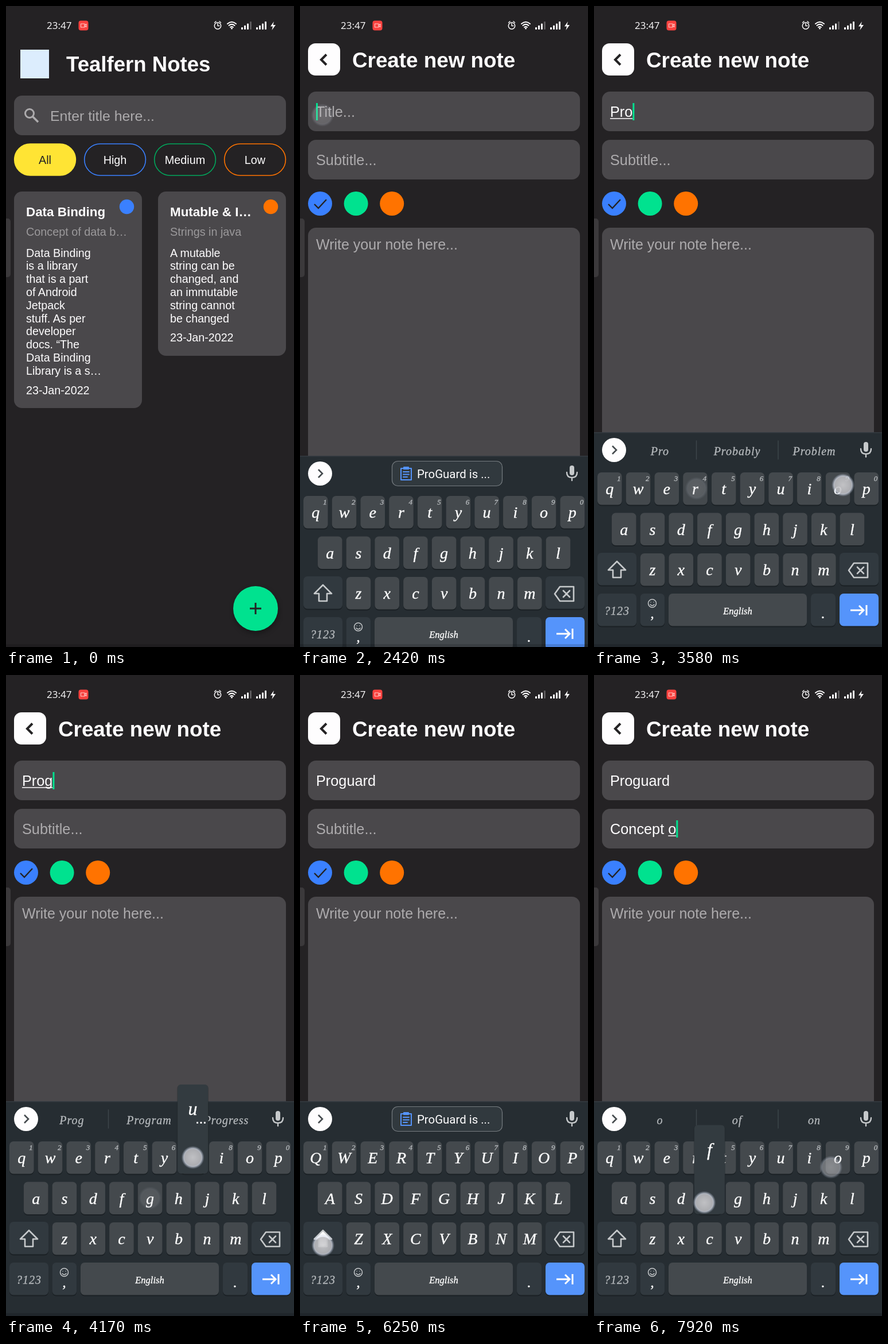
Recreate the animation shown at these times as an HTML page. Size 502 by 1116 pixels, loop 8 s.

```html
<!DOCTYPE html>
<html lang="en">
<head>
<meta charset="utf-8">
<title>Notes app</title>
<style>
html, body { margin: 0; width: 100%; height: 100%; overflow: hidden; background: #242224; }
svg { display: block; width: 502px; height: 1116px; font-family: "Liberation Sans", Arial, sans-serif; }
.b { font-weight: 700; }
.mid { text-anchor: middle; }
.kb { font-family: "Liberation Serif", "Noto Serif", serif; font-style: italic; fill: #fff; stroke: #fff; stroke-width: .35; text-anchor: middle; }
.dim { fill: #b4b8bb; stroke: #b4b8bb; }
.line { fill: none; stroke-linecap: round; stroke-linejoin: round; }
</style>
</head>
<body>
<svg id="stage" viewBox="0 0 502 1116"></svg>
<script>
const LOOP = 8000, FPS = 12;
const BG = '#242224', CARD = '#4a484b', HINT = '#adabad', WHITE = '#fefdfe';
const BLUE = '#3a80ff', GREEN = '#00e28f', ORANGE = '#ff7300';
const KEY = '#44494d', DARK_KEY = '#31393f', KEYBOARD = '#262d32';
const FIELD_SIZE = 25.3;

// Drawing helpers
const text = (x, y, size, str, fill = WHITE, cls = '') =>
  `<text x="${x}" y="${y}" font-size="${size}" fill="${fill}" class="${cls}">${str}</text>`;
const box = (x, y, w, h, r, fill, extra = '') =>
  `<rect x="${x}" y="${y}" width="${w}" height="${h}" rx="${r}" fill="${fill}" ${extra}/>`;
const disc = (x, y, r, fill, extra = '') => `<circle cx="${x}" cy="${y}" r="${r}" fill="${fill}" ${extra}/>`;
const line = (d, stroke, w, extra = '') =>
  `<path class="line" d="${d}" stroke="${stroke}" stroke-width="${w}" ${extra}/>`;
const script = (x, y, size, str, cls = '', extra = '') =>
  `<text x="${x}" y="${y}" font-size="${size}" class="kb ${cls}" ${extra}>${str}</text>`;
const group = (id, body) => `<g id="${id}">${body}</g>`;
const SHARP = 'style="stroke-linecap:butt;stroke-linejoin:miter"';

const bars = (x, n) => [0, 1, 2, 3].map(i =>
  box(x + i * 5, 37 - i * 3.3, 3, 4 + i * 3.3, 1, i < n ? WHITE : '#5c5a5c')).join('');

const statusBar = () =>
  `<text x="71" y="40" font-size="17" fill="${WHITE}" style="font-family:'Open Sans','Noto Sans',sans-serif">23:47</text>` +
  box(126.5, 25.5, 17, 17, 4, '#f8423f') +
  line('M130.5 31h6.5v6h-6.5zM137 33.5l3-2v5l-3-2', '#ffc9c6', 1.1) +
  line('M369 30.5v4h3M363.5 29l2.5-2.2M374.5 29l-2.5-2.2', WHITE, 1.4) +
  disc(369, 34.5, 5.7, 'none', `stroke="${WHITE}" stroke-width="1.5"`) +
  line('M386 31q7.5-6.5 15 0M388.5 34q5-4.2 10 0M391 37q2.5-2 5 0', WHITE, 2) +
  disc(393.5, 39, 1.5, WHITE) + bars(410, 3) + bars(436, 4) +
  `<path d="M467 27l-6 8.5h4l-1.5 6.5 6.5-9h-4.5z" fill="${WHITE}"/>`;

const fab = icon => disc(436, 1053, 39, '#000', 'opacity=".35" filter="url(#blur)"') +
  disc(435, 1049, 39, GREEN) + icon;

function noteCard(x, h, dot, title, sub, lines, date) {
  const tx = x + 21;
  return box(x, 323, 223, h, 14, CARD) + disc(x + 196.5, 349.5, 12.7, dot) +
    text(tx, 366, 22.4, title, WHITE, 'b') + text(tx, 400, 19.8, sub, '#9b999b') +
    lines.map((s, i) => text(tx, 436.5 + i * 22.8, 19.7, s)).join('') +
    text(tx, 447.5 + lines.length * 22.8, 19.7, date);
}

const home = () =>
  box(25, 76, 50, 50, 0, '#dcedfd') +
  text(105, 113.5, 36.6, 'Tealfern Notes', WHITE, 'b') +
  box(14, 156, 474, 69, 14, CARD) +
  disc(41, 187, 7.5, 'none', `stroke="${HINT}" stroke-width="3"`) + line('M46.5 192.5l9.5 9.5', HINT, 3.6, SHARP) +
  text(77, 200, 24.8, 'Enter title here...', HINT) +
  [['All', '#ffe434'], ['High', BLUE], ['Medium', '#00a85c'], ['Low', ORANGE]].map(([s, c], i) =>
    box(14.7 + i * 122, 240, 106.7, 55, 27.5, i ? 'none' : c, `stroke="${c}" stroke-width="1.6"`) +
    text(68 + i * 122, 274.5, 19.8, s, i ? WHITE : BG, 'mid')).join('') +
  noteCard(14, 377, BLUE, 'Data Binding', 'Concept of data b…',
    ['Data Binding', 'is a library', 'that is a part', 'of Android', 'Jetpack', 'stuff. As per', 'developer',
      'docs. “The', 'Data Binding', 'Library is a s…'], '23-Jan-2022') +
  noteCard(265, 286, ORANGE, 'Mutable &amp; I…', 'Strings in java',
    ['A mutable', 'string can be', 'changed, and', 'an immutable', 'string cannot', 'be changed'], '23-Jan-2022') +
  fab(line('M425 1049h20M435 1039v20', BG, 3, SHARP));

const field = (id, y) => box(14, y, 474, 69, 14, CARD) +
  `<text id="${id}" x="28" y="${y + 44}" font-size="${FIELD_SIZE}"></text>`;

const editor = () =>
  box(14, 65, 56, 56, 13, WHITE) + line('M46 84.5l-9 9 9 9', BG, 4, SHARP) +
  text(91, 106.5, 36.8, 'Create new note', WHITE, 'b') +
  field('title', 149) + field('subtitle', 233) +
  [BLUE, GREEN, ORANGE].map((c, i) => disc(35 + i * 62.6, 344, 21, c)).join('') +
  line('M25 345l7 7 14-15', BG, 2.4, SHARP) +
  box(14, 386, 474, 488, 14, CARD) + text(28, 424, 25, 'Write your note here...', HINT) +
  fab(`<path d="M425 1036h18l5 5v17q0 3-3 3h-20q-3 0-3-3v-19q0-3 3-3z" fill="${BG}"/>` +
    box(425, 1039, 15, 6, 0, GREEN) + disc(435, 1054, 4.5, GREEN)) +
  `<path id="under" stroke="${WHITE}" stroke-width="1.4"/>` + box(0, 0, 3, 30, 0, GREEN, 'id="caret"');

// Key centres
const PITCH = 49.72, keys = { '^': [40, 981], ' ': [250, 1052] };
[['qwertyuiop', 27.3], ['asdfghjkl', 52.2], ['zxcvbnm', 102]].forEach(([row, x], r) =>
  [...row].forEach((k, i) => keys[k] = [x + i * PITCH, 840 + r * 70.5]));
const isLetter = k => /[a-z]/.test(k);

const cap = (x, y, w, fill) => box(x, y + 1.5, w, 57, 7, '#1b2125') + box(x, y, w, 56.5, 7, fill);

function keyboard() {
  const letters = Object.entries(keys).filter(([k]) => isLetter(k)).map(([k, [x, y]]) =>
    cap(x - 21.3, y - 28, 42.6, KEY) + script(x, y + 10, 28, k, '', `data-key="${k}"`)).join('');
  const digits = [...'1234567890'].map((d, i) => script(43.5 + i * PITCH, 827, 13, d, 'dim')).join('');
  const g = '#c6c9cb';
  return box(0, 742, 502, 374, 0, KEYBOARD) + box(0, 742, 502, 1.5, 0, '#343b41') +
    disc(35, 773, 21, WHITE) + line('M32 766l7 7-7 7', '#454a4e', 2.6, SHARP) +
    box(470, 759, 8, 17, 4, g) + line('M465 771q0 9 9 9t9-9M474 780v5', g, 2.4) +
    group('chip', box(160.5, 751.5, 192, 43, 10, '#31393e', 'stroke="#767c80" stroke-width="1.2"') +
      line('M176 764h18v20h-18zM180 770h10M180 774.5h10M180 779h7', '#5594fb', 2) + box(180, 761, 10, 5, 1, '#5594fb') +
      `<text x="204" y="781" font-size="20.4" fill="${WHITE}" style="font-family:Roboto,sans-serif">ProGuard is ...</text>`) +
    group('words', line('M178.5 757v32M321 757v32', '#3d454a', 1.5, 'id="seps"') +
      [115, 249.5, 384].map(x => script(x, 782, 20, '', 'dim', 'data-word="" letter-spacing="1"')).join('')) +
    letters + digits +
    cap(6, 952, 68, DARK_KEY) + cap(428, 952, 68, DARK_KEY) +
    line('M40 967l15 15h-8v13h-14v-13h-8z', g, 2.6, 'id="shift"') +
    line('M453 970h24v25h-24l-9-12.5zM459 977l11 11M470 977l-11 11', g, 2.6) +
    cap(6, 1023, 68, DARK_KEY) + cap(80.5, 1023, 42.6, DARK_KEY) + cap(130, 1023, 241, KEY) +
    cap(378, 1023, 43, DARK_KEY) + cap(428, 1023, 68, '#5594fb') +
    script(40, 1060, 20, '?123', 'dim', 'letter-spacing="1"') +
    disc(101.5, 1040, 7, 'none', `stroke="${g}" stroke-width="1.5"`) +
    line('M98 1042q3.5 4 7 0M99 1038v.1M104 1038v.1', g, 1.5) +
    script(101.5, 1066, 26, ',') + script(399.5, 1066, 26, '.') + script(250.5, 1059, 16.5, 'English') +
    line('M447 1052h23M462 1044l8 8-8 8M475 1043v18', WHITE, 3, SHARP);
}

const $ = id => document.getElementById(id);
$('stage').innerHTML = `<defs><filter id="blur"><feGaussianBlur stdDeviation="5"/></filter>
  <radialGradient id="glow"><stop offset="0" stop-color="#cfcfd2" stop-opacity=".9"/>
  <stop offset=".7" stop-color="#bdbdc1" stop-opacity=".88"/><stop offset=".78" stop-color="#e4e8f4" stop-opacity=".7"/>
  <stop offset="1" stop-color="#b8c4dc" stop-opacity="0"/></radialGradient></defs>` +
  box(0, 0, 502, 1116, 0, BG) + group('home', home()) + group('editor', editor()) +
  statusBar() + box(-8, 370, 16, 102, 5, '#3b393b') +
  group('keyboard', keyboard()) +
  group('popup', box(-27.5, -127, 55, 157, 7, '#1d2327', 'opacity=".35"') + box(-26.5, -127, 53, 155, 6, '#333b40') +
    script(0, -74, 32, '', '', 'id="popKey"') + text(14.5, -59, 20, '…', WHITE, 'b mid')) +
  box(0, 1111, 502, 5, 0, '#000', 'opacity=".15"') + group('touches', '');

// Taps: press, release, key or place, shift from its centre
const SPOTS = { add: [435, 1038], title: [39, 190], subtitle: [48, 272] };
const taps = [
  [1250, 1330, 'add'], [2250, 2300, 'title'],
  [2750, 2840, '^', 0, 14], [3000, 3080, 'p'], [3250, 3420, 'r', 2, 0], [3500, 3580, 'o', 9, -6],
  [3920, 4000, 'g'], [4170, 4250, 'u'], [4420, 4500, 'a'], [4580, 4670, 'r'], [4750, 4790, 'd'],
  [5330, 5420, 'subtitle'],
  [6170, 6250, '^', 0, 12], [6420, 6500, 'c'], [6580, 6660, 'o'], [6750, 6830, 'n'], [6920, 6980, 'c'],
  [7170, 7250, 'e', -1, 12], [7330, 7410, 'p'], [7500, 7580, 't'], [7660, 7720, ' ', 0, -8],
  [7750, 7830, 'o', -12, 17], [7920, 8000, 'f', -9, 8]
];

const suggestions = {
  P: 'P Please Put', Pr: 'Pr Pretty Probably', Pro: 'Pro Probably Problem', Prog: 'Prog Program Progress',
  Progu: 'Progu Program Prog', Progua: 'Progua', Proguar: 'Proguar', Proguard: 'Proguard',
  C: 'C Can Could', Co: 'Co Could Come', Con: 'Con Contact Confirm', Conc: 'Conc Concept Concrete',
  Conce: 'Conce Concept Concert', Concep: 'Concep Concept Concepts', Concept: 'Concept Concepts Concert',
  '': 'of is and', o: 'o of on'
};

const measure = document.createElement('canvas').getContext('2d');
measure.font = FIELD_SIZE + 'px "Liberation Sans", Arial, sans-serif';
const widthOf = s => measure.measureText(s).width;
const show = (id, on) => $(id).style.display = on ? '' : 'none';

// Replay all taps released by time t
function stateAt(t) {
  const s = { title: '', subtitle: '', focus: '', caps: false, edited: 0 };
  for (const [, up, k] of taps) {
    if (up > t || k === 'add') continue;
    if (k === '^') { s.caps = true; continue; }
    s.edited = up;
    if (k in SPOTS) { s.focus = k; continue; }
    s[s.focus] += s.caps ? k.toUpperCase() : k;
    s.caps = false;
  }
  return s;
}

function drawField(id, value, hint) {
  $(id).textContent = value || hint;
  $(id).setAttribute('fill', value ? WHITE : HINT);
}

function drawInput(s, t) {
  drawField('title', s.title, 'Title...');
  drawField('subtitle', s.subtitle, 'Subtitle...');
  const value = s[s.focus] || '', word = value.split(' ').pop();
  const y = s.focus === 'title' ? 169 : 253;
  const end = 28 + widthOf(value), start = 28 + widthOf(value.slice(0, value.length - word.length));
  $('under').setAttribute('d', word ? `M${start} ${y + 27}H${end}` : '');
  show('caret', s.focus && Math.floor((t - s.edited) / 500) % 2 === 0);
  $('caret').setAttribute('x', end);
  $('caret').setAttribute('y', y);

  show('chip', !value);
  show('words', value);
  const list = (suggestions[word] || word).split(' ');
  show('seps', list.length > 1);
  document.querySelectorAll('[data-word]').forEach((el, i) =>
    el.textContent = list.length > 1 ? list[i] : i === 1 ? list[0] : '');
}

function drawKeyboard(s, t) {
  const p = Math.min(1, Math.max(0, (t - 2250) / 325));
  show('keyboard', p > 0);
  $('keyboard').setAttribute('transform', `translate(0 ${Math.round(374 * (1 - p) ** 3)})`);
  const cased = k => s.caps ? k.toUpperCase() : k;
  document.querySelectorAll('[data-key]').forEach(el => el.textContent = cased(el.dataset.key));
  $('shift').style.fill = s.caps ? '#fff' : 'none';

  const held = taps.find(([down, up, k]) => down <= t && t < up && k.length === 1 && isLetter(k));
  show('popup', held);
  if (!held) return;
  const k = held[2], [x, y] = keys[k];
  $('popup').setAttribute('transform', `translate(${x} ${y})`);
  $('popKey').textContent = cased(k);
  $('popup').lastElementChild.style.display = 'euioasnc'.includes(k) ? '' : 'none';
}

function drawTouches(t) {
  $('touches').innerHTML = taps.map(([down, up, k, dx = 0, dy = 0]) => {
    const fade = 1 - Math.max(0, t - up) / 200;
    if (t < down || fade <= 0) return '';
    const [x, y] = SPOTS[k] || keys[k];
    return disc(x + dx, y + dy, 20, 'url(#glow)', `opacity="${fade * (k in SPOTS ? .7 : 1)}"`);
  }).join('');
}

function render(time) {
  const t = Math.round(Math.floor((time + 4) * FPS / 1000) * 100 / FPS) * 10;
  const s = stateAt(t);
  show('home', t < 1420);
  show('editor', t >= 1420);
  drawInput(s, t);
  drawKeyboard(s, t);
  drawTouches(t);
}

const begin = performance.now();
(function tick() {
  render((performance.now() - begin) % LOOP);
  requestAnimationFrame(tick);
})();
</script>
</body>
</html>
```
